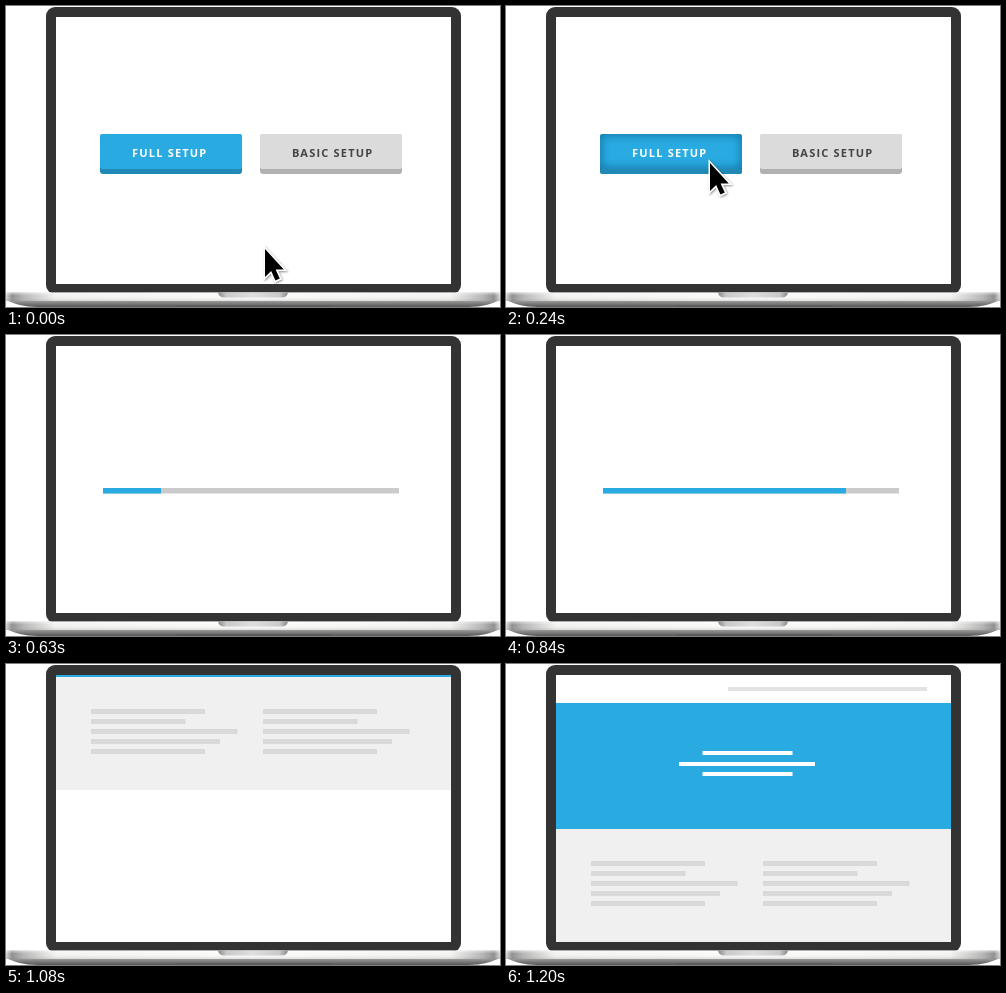
Animation of 494x301 px, one loop 2100 ms. Source, as an HTML page:

```html
<!DOCTYPE html>
<html lang="en">
<head>
<meta charset="utf-8">
<title>Setup</title>
<style>
html, body { margin: 0; width: 100%; height: 100%; overflow: hidden; background: #fff; }
svg { display: block; width: 494px; height: 301px; }
text { font: 700 11px "Open Sans", sans-serif; letter-spacing: 1.2px; }
</style>
</head>
<body>
<svg viewBox="0 0 494 301">
  <defs>
    <clipPath id="screen"><rect x="50" y="11" width="395" height="267"/></clipPath>
    <clipPath id="face"><rect x="94" y="128" width="142" height="40" rx="3"/></clipPath>
    <filter id="soft" x="-20%" y="-50%" width="140%" height="200%"><feGaussianBlur stdDeviation="4"/></filter>
    <filter id="shadow" x="-40%" y="-40%" width="180%" height="180%">
      <feDropShadow dx="1" dy="1" stdDeviation="1.2" flood-color="#000" flood-opacity=".45"/>
    </filter>
    <linearGradient id="metal">
      <stop offset="0" stop-color="#d8d8d8"/>
      <stop offset=".012" stop-color="#8c8c8c"/>
      <stop offset=".035" stop-color="#b4b4b4"/>
      <stop offset=".1" stop-color="#f2f2f0"/>
      <stop offset=".5" stop-color="#fbfbf9"/>
      <stop offset=".9" stop-color="#f2f2f0"/>
      <stop offset=".965" stop-color="#b4b4b4"/>
      <stop offset=".988" stop-color="#8c8c8c"/>
      <stop offset="1" stop-color="#d8d8d8"/>
    </linearGradient>
    <linearGradient id="shade" x2="0" y2="1">
      <stop offset="0" stop-color="#fff" stop-opacity=".5"/>
      <stop offset=".4" stop-color="#fff" stop-opacity="0"/>
      <stop offset="1" stop-color="#888" stop-opacity=".25"/>
    </linearGradient>
    <linearGradient id="under" x2="0" y2="1">
      <stop offset="0" stop-color="#a5a5a5"/>
      <stop offset="1" stop-color="#555"/>
    </linearGradient>
    <linearGradient id="notch">
      <stop offset="0" stop-color="#888"/>
      <stop offset=".12" stop-color="#c9c9c9"/>
      <stop offset=".5" stop-color="#dedede"/>
      <stop offset=".88" stop-color="#c9c9c9"/>
      <stop offset="1" stop-color="#888"/>
    </linearGradient>
  </defs>

  <rect x="40" y="1" width="415" height="287" rx="9" fill="#333"/>
  <rect x="50" y="11" width="395" height="267" fill="#fff"/>
  <path d="M0 294H494C485 298 477 301 462 301H32C17 301 9 298 0 294Z" fill="url(#under)"/>
  <path d="M171 299H325V301H171Z" fill="#555" opacity=".5"/>
  <path d="M0 286.5H494V295H0Z" fill="url(#metal)"/>
  <path d="M0 286.5H494V295H0Z" fill="url(#shade)"/>
  <path d="M212 286.5H282Q281 291.5 276 291.5H218Q213 291.5 212 286.5Z" fill="url(#notch)"/>

  <g id="choice">
    <rect x="94" y="128" width="142" height="40" rx="3" fill="#2089b6"/>
    <rect x="94" y="128" width="142" height="35" rx="2.5" fill="#29abe2"/>
    <g id="glow" clip-path="url(#face)">
      <path d="M84 118H246V178H84ZM96 130V161H234V130Z" fill="#0d5f85" fill-rule="evenodd" opacity=".6" filter="url(#soft)"/>
      <path d="M94 163H236V168H94Z" fill="#2089b6"/>
    </g>
    <rect x="254" y="128" width="142" height="40" rx="3" fill="#b1b1b1"/>
    <rect x="254" y="128" width="142" height="35" rx="2.5" fill="#dbdbdb"/>
    <text x="126" y="151" fill="#fff">FULL SETUP</text>
    <text x="286" y="151" fill="#444">BASIC SETUP</text>
    <path id="cursor" d="M259 243V271L265.2 265L269.4 274.6L273.8 272.6L269.6 263.4H277.8Z"
      stroke="#fff" stroke-width="3" paint-order="stroke" filter="url(#shadow)"/>
  </g>

  <g id="progress">
    <rect x="97" y="153" width="296" height="5.5" fill="#cbcbcb"/>
    <rect id="fill" x="97" y="153" width="0" height="5.5" fill="#29abe2"/>
  </g>

  <g clip-path="url(#screen)"><g id="page">
    <rect x="50" y="11" width="395" height="28" fill="#fff"/>
    <rect x="50" y="39" width="395" height="126" fill="#29abe2"/>
    <rect x="50" y="165" width="395" height="113" fill="#f0f0f0"/>
  </g></g>
</svg>
<script>
const LOOP = 2100, STEP = 30;
const el = id => document.getElementById(id);
const clamp = (v, lo, hi) => Math.min(hi, Math.max(lo, v));
const show = (id, on) => { el(id).style.display = on ? "" : "none"; };

function line(x, y, width, height, color) {
  const bar = document.createElementNS("http://www.w3.org/2000/svg", "rect");
  const attrs = { x, y, width, height, fill: color };
  for (const name in attrs) bar.setAttribute(name, attrs[name]);
  el("page").append(bar);
}

line(222, 23, 199, 4, "#e3e3e3");
line(196.5, 87, 90, 4, "#fff");
line(173, 98, 136, 4, "#fff");
line(196.5, 108, 90, 4, "#fff");
for (const x of [85, 257])
  [114, 94.5, 146.5, 129, 114].forEach((w, i) => line(x, 197 + i * 10, w, 5, "#d9d9d9"));

function draw(now) {
  const t = Math.floor((now % LOOP) / STEP) * STEP;

  const reach = clamp(t / 240, 0, 1);
  show("choice", t < 420);
  el("cursor").setAttribute("transform", `translate(${-55 * reach} ${-86 * reach})`);
  el("glow").setAttribute("opacity", reach);

  show("progress", t >= 480 && t < 930);
  el("fill").setAttribute("width", clamp(58 + (t - 630) * 185 / 210, 0, 296));

  show("page", t >= 990);
  el("page").setAttribute("transform", `translate(0 ${-266 * clamp((1200 - t) / 210, 0, 1)})`);
}

const start = performance.now();
function tick() {
  draw(performance.now() - start);
  requestAnimationFrame(tick);
}
draw(0);
requestAnimationFrame(tick);
</script>
</body>
</html>
```
